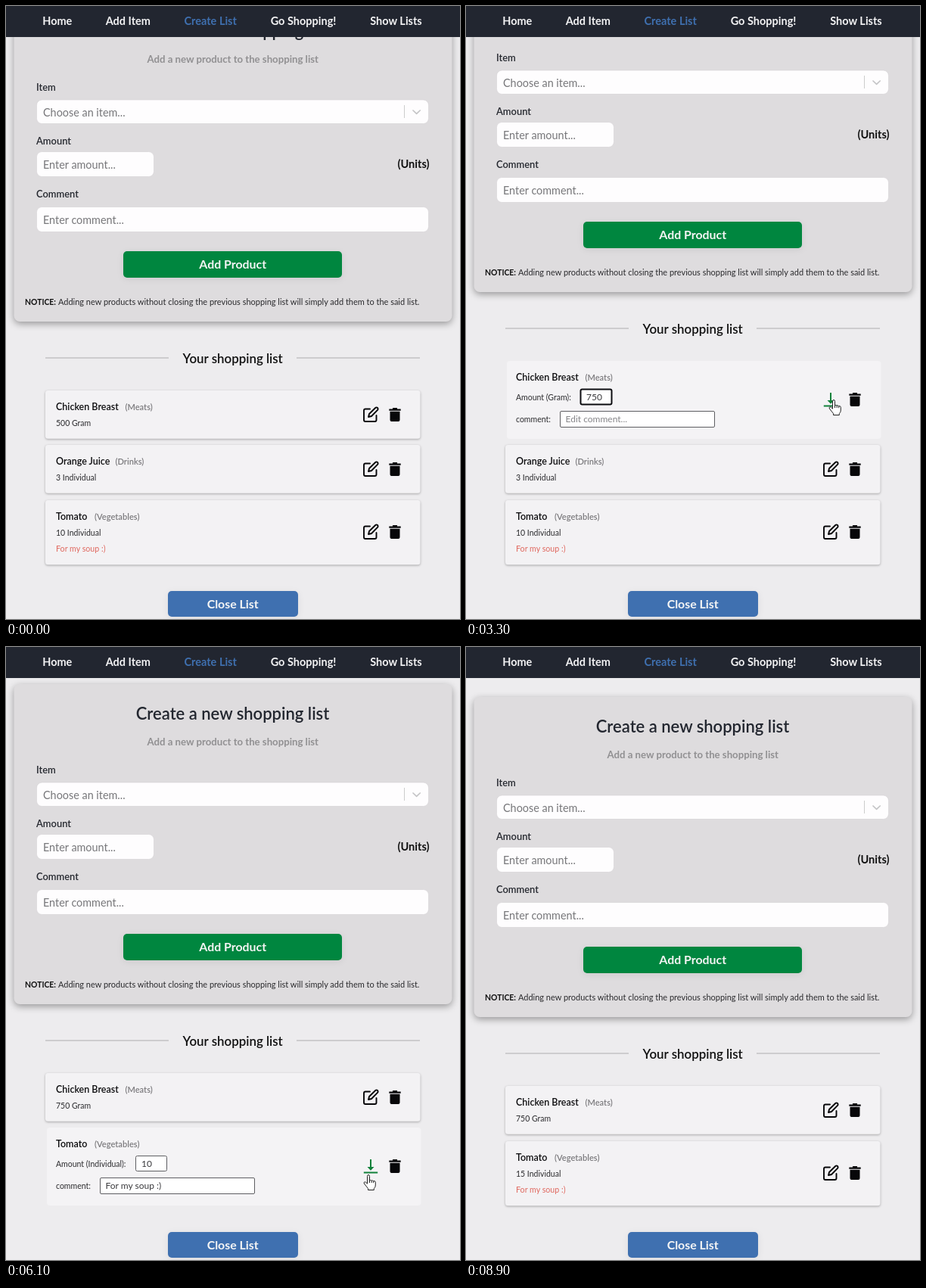
These frames come from a looping animation (600 px wide and 810 px high, 9300 ms). An HTML page:

```html
<!DOCTYPE html>
<html lang="en">
<head>
<meta charset="utf-8">
<title>Shopping list</title>
<style>
  html, body { margin: 0; width: 100%; height: 100%; overflow: hidden; background: #edecee; }
  svg { display: block; width: 600px; height: 810px; font-family: Lato, "Open Sans", sans-serif; }
  text { white-space: pre; }
  .mid { text-anchor: middle; }
  .nav { font-size: 14.5px; font-weight: 700; fill: #f3f3f4; }
  .nav .on { fill: #3f70b0; }
  .panel { fill: #dedcde; filter: drop-shadow(0 3px 5px rgba(0,0,0,.36)); }
  .title { font-size: 22px; font-weight: 600; fill: #22262f; }
  .sub { font-size: 13.2px; font-weight: 700; fill: #919092; }
  .label { font-size: 12.9px; font-weight: 600; fill: #24272e; }
  .hint { font-size: 14.4px; fill: #77777a; }
  .field { fill: #fefdfe; stroke: #d3d1d4; stroke-width: .6; }
  .units { font-size: 14.6px; font-weight: 700; text-anchor: end; fill: #111; }
  .button { font-size: 15.9px; font-weight: 700; fill: #f5f5f5; }
  .raised { filter: drop-shadow(0 2px 4px rgba(0,0,0,.07)); }
  .notice { font-size: 10.97px; fill: #2a2a2d; }
  .notice .strong { font-size: 10.4px; font-weight: 700; fill: #111; }
  .heading { font-size: 16.9px; font-weight: 600; fill: #111; }
  .card { fill: #f3f2f4; filter: drop-shadow(0 1px 1.5px rgba(0,0,0,.3)); }
  .open { fill: #f4f3f5; }
  .name { font-size: 12.5px; font-weight: 600; fill: #0c0c0e; }
  .kind { font-size: 11.1px; font-weight: 600; fill: #7b7a7d; }
  .small { font-size: 10.5px; fill: #2b2b2e; }
  .note { font-size: 10.7px; fill: #e0685f; }
  .input { fill: #fff; stroke: #5e5e62; }
  .focus { stroke: #0c0c10; stroke-width: 2; }
  .value { font-size: 12px; fill: #3a3a3d; }
  .value.empty { fill: #858588; }
  .value.picked { fill: #fff; }
  .popup { fill: #242528; filter: drop-shadow(0 1px 3px rgba(0,0,0,.4)); }
  .choice { font: 500 11px Roboto, sans-serif; fill: #eee; }
  .pen, .caret { fill: none; stroke-linecap: round; stroke-linejoin: round; }
  .pen { stroke-width: 1.9; }
</style>
</head>
<body>
<svg viewBox="0 0 600 810">
  <rect width="600" height="810" fill="#edecee"/>
  <g id="form">
    <rect class="panel" x="10.5" width="579" height="423" rx="8"/>
    <text class="title mid" x="299.5" y="46.5">Create a new shopping list</text>
    <text class="sub mid" x="299.7" y="81">Add a new product to the shopping list</text>
    <text class="label" x="40" y="118">Item</text>
    <rect class="field" x="40.5" y="130" width="518" height="31.5" rx="7"/>
    <text class="hint" x="49" y="151.5">Choose an item...</text>
    <path d="M526.5 137v17" stroke="#ccc"/>
    <path class="caret" d="M538 144l4.6 4.3 4.6-4.3" stroke="#c4c4c6" stroke-width="1.7"/>
    <text class="label" x="40" y="189">Amount</text>
    <rect class="field" x="40.5" y="198.5" width="155" height="33" rx="7"/>
    <text class="hint" x="49" y="220.5">Enter amount...</text>
    <text class="units" x="559.5" y="220.3">(Units)</text>
    <text class="label" x="40" y="259">Comment</text>
    <rect class="field" x="40.5" y="271.5" width="518" height="33" rx="7"/>
    <text class="hint" x="49" y="293.5">Enter comment...</text>
    <rect class="raised" x="155" y="330" width="289" height="35" rx="5" fill="#00863f"/>
    <text class="button mid" x="299.7" y="353.4">Add Product</text>
    <g class="notice">
      <text class="strong" x="25" y="400.5">NOTICE:</text>
      <text x="69" y="400.5">Adding new products without closing the previous shopping list will simply add them to the said list.</text>
    </g>
    <path d="M52 471H215M384 471H547" stroke="#cdccce" stroke-width="2"/>
    <text class="heading mid" x="299.7" y="477.7">Your shopping list</text>
  </g>
  <g id="list"></g>
  <rect class="raised" x="214" y="773" width="172" height="34" rx="5" fill="#3f70b0"/>
  <text class="button mid" x="299.7" y="796">Close List</text>
  <g class="nav mid">
    <rect width="600" height="41" fill="#222630"/>
    <text x="67.8" y="25">Home</text>
    <text x="161.3" y="25">Add Item</text>
    <text x="270.2" y="25" class="on">Create List</text>
    <text x="393" y="25">Go Shopping!</text>
    <text x="515.5" y="25">Show Lists</text>
  </g>
  <g id="popup"></g>
  <g id="cursor"></g>
</svg>
<script>
const LOOP = 9300, STEP = 100;
const GAP = 8.8, LIST_END = 738.2, LIST_TOP = 514;
const $ = id => document.getElementById(id);

// Pointer path: time, x, y
const path = [
  [200, 610, 650], [900, 484, 543], [1200, 484, 543], [1700, 188, 518],
  [2800, 188, 518], [3300, 486, 521], [3600, 486, 521], [4200, 511, 616],
  [4800, 511, 616], [5300, 479, 698], [6100, 479, 698], [6600, 192, 684],
  [7150, 192, 684], [7500, 408, 687], [7700, 408, 687], [8100, 482, 690],
  [8400, 482, 690], [8800, 612, 760]
];

function pointerAt(t) {
  const i = path.findIndex(p => p[0] > t);
  if (i < 1) return null;
  const [t0, x0, y0] = path[i - 1], [t1, x1, y1] = path[i];
  const k = (t - t0) / (t1 - t0), e = k * k * (3 - 2 * k);
  return { x: x0 + (x1 - x0) * e, y: y0 + (y1 - y0) * e };
}

// Last value whose start time has passed
const at = (t, steps) => steps.reduce((v, [start, value]) => t >= start ? value : v, null);
const within = (t, a, b) => t >= a && t < b;

function itemsAt(t) {
  const chicken = {
    name: 'Chicken Breast', kind: 'Meats', kindX: 157.5, unit: 'Gram', note: '', inputX: 151.5,
    amount: at(t, [[0, '500'], [2400, '7'], [2600, '75'], [2800, '750']]),
    editing: within(t, 1100, 3500), focus: within(t, 2000, 3500), picked: within(t, 2100, 2400),
    caret: within(t, 2400, 2900)
  };
  const juice = { name: 'Orange Juice', kind: 'Drinks', kindX: 144.5, unit: 'Individual', note: '', amount: '3' };
  const tomato = {
    name: 'Tomato', kind: 'Vegetables', kindX: 117, unit: 'Individual', note: 'For my soup :)', inputX: 171.5,
    amount: at(t, [[0, '10'], [7200, '1'], [7700, '15']]),
    editing: within(t, 5700, 8300), focus: within(t, 6700, 8300), picked: within(t, 6800, 7200),
    caret: within(t, 7200, 8000), popup: within(t, 7200, 7700)
  };
  return t < 4600 ? [chicken, juice, tomato] : [chicken, tomato];
}

const height = item => item.editing ? 102.9 : item.note ? 85.2 : 63.8;
const text = (cls, x, y, s) => `<text class="${cls}" x="${x}" y="${y}">${s}</text>`;

const icons = {
  edit: c => `<g class="pen" stroke="${c}"><path d="M-1-7.5H-7a2 2 0 0 0-2 2V7a2 2 0 0 0 2 2H5.5a2 2 0 0 0 2-2V1"/>
    <path d="M6.2-9a1.9 1.9 0 0 1 2.8 2.8L1 2l-4 1 1-4Z"/></g>`,
  save: c => `<path d="M-1-9H1V1H4.5L0 5.8-4.5 1H-1ZM-9.2 7.5H9.2v2H-9.2Z" fill="${c}"/>`,
  trash: c => `<path d="M-3-9H3V-7.5H7.7V-5.3H-7.7V-7.5H-3ZM-6.5-4.3H6.5V7a2 2 0 0 1-2 2H-4.5a2 2 0 0 1-2-2Z" fill="${c}"/>`
};
const hoverColor = { edit: '#3f70b0', save: '#11813a', trash: '#c8143c' };

const cursors = {
  arrow: '<path d="M0 0V13.5L3.2 10.6 5.4 15.7 7.6 14.7 5.4 9.8H9.5Z" fill="#fff" stroke="#222"/>',
  hand: `<path d="M-1.5 1.5q0-2 1.5-2t1.5 2V7q1-1 2.6.2 1.2-.8 2.5.4 2.4-.5 2.7 1.6V13q0 3-2 4.5V19.5H-.5V17.5L-5.7 11q-.8-2 1-2.2 1.2 0 3.2 2.4Z"
    fill="#fff" stroke="#222" stroke-linejoin="round"/><path d="M1.5 7v3M4.2 7.5v2.5M6.7 8v2.2" stroke="#222"/>`,
  beam: '<path d="M-2.8-7.5H-1L0-6.7 1-7.5H2.8M0-6.7V6.7M-2.8 7.5H-1L0 6.7 1 7.5H2.8" fill="none" stroke="#111" stroke-width="1.3"/>'
};

function card(item, top, pointer, hit) {
  const h = height(item), edit = item.editing;
  const icon = (kind, x) => {
    const y = Math.floor(top + h / 2 + .2);
    const hover = pointer && Math.abs(pointer.x - x) < 12 && Math.abs(pointer.y - y) < 13;
    if (hover) hit.kind = 'hand';
    return `<g transform="translate(${x} ${y})">${icons[kind](hover ? hoverColor[kind] : '#070709')}</g>`;
  };
  let out = edit
    ? `<rect class="open" x="54" y="${top}" width="494.5" height="${h}" rx="4"/>`
    : `<rect class="card" x="52" y="${top}" width="495.5" height="${h}" rx="3.5"/>`;
  out += text('name', 66, top + 26.3, item.name) + text('kind', item.kindX, top + 26.2, `(${item.kind})`);
  if (edit) out += editor(item, top, pointer, hit);
  else {
    out += text('small', 66, top + 47, `${item.amount} ${item.unit}`);
    if (item.note) out += text('note', 66, top + 68.2, item.note);
  }
  return out + icon(edit ? 'save' : 'edit', 482) + icon('trash', 514);
}

function editor(item, top, pointer, hit) {
  const x = item.inputX, textX = x + 7.5, w = item.amount.length * 7;
  if (pointer && Math.abs(pointer.x - x - 20) < 21 && Math.abs(pointer.y - top - 47) < 11) hit.kind = 'beam';
  return text('small', 66, top + 51.5, `Amount (${item.unit}):`) +
    `<rect class="input ${item.focus ? 'focus' : ''}" x="${x}" y="${top + 37.5}" width="41" height="20" rx="2"/>` +
    (item.picked ? `<rect x="${textX}" y="${top + 40}" width="${w}" height="14.5" fill="#3268c8"/>` : '') +
    text(item.picked ? 'value picked' : 'value', textX, top + 52, item.amount) +
    (item.caret ? `<path d="M${textX + w - 1.5} ${top + 40.5}v13.5" stroke="#222"/>` : '') +
    text('small', 66, top + 80.8, 'comment:') +
    `<rect class="input" x="124.5" y="${top + 66.5}" width="204" height="21" rx="1.5"/>` +
    text(item.note ? 'value' : 'value empty', 131.5, top + 81.3, item.note || 'Edit comment...');
}

function popup(top) {
  return `<g transform="translate(173.5 ${top})"><path class="popup" d="M4 66.5H12L18.5 60 25 66.5H37.5a4 4 0 0 1 4 4V132a4 4 0 0 1-4 4H4a4 4 0 0 1-4-4V70.5a4 4 0 0 1 4-4Z"/>` +
    text('choice', 10.3, 90, '15') + text('choice', 10.3, 121, '1') + '</g>';
}

function draw(t) {
  const items = itemsAt(t), pointer = pointerAt(t), hit = { kind: 'arrow' };
  const total = items.reduce((sum, item) => sum + height(item) + GAP, -GAP);
  let y = LIST_END - total, cards = '', menu = '';
  $('form').setAttribute('transform', `translate(0 ${Math.round(y) - LIST_TOP})`);
  for (const item of items) {
    const top = Math.round(y);
    cards += card(item, top, pointer, hit);
    if (item.popup) menu = popup(top);
    y += height(item) + GAP;
  }
  $('list').innerHTML = cards;
  $('popup').innerHTML = menu;
  $('cursor').innerHTML = pointer
    ? `<g transform="translate(${pointer.x} ${pointer.y})">${cursors[hit.kind]}</g>` : '';
}

const start = performance.now();
let shown = -1;
function tick() {
  const t = Math.floor(((performance.now() - start) % LOOP) / STEP) * STEP;
  if (t !== shown) draw(shown = t);
  requestAnimationFrame(tick);
}
tick();
</script>
</body>
</html>
```
